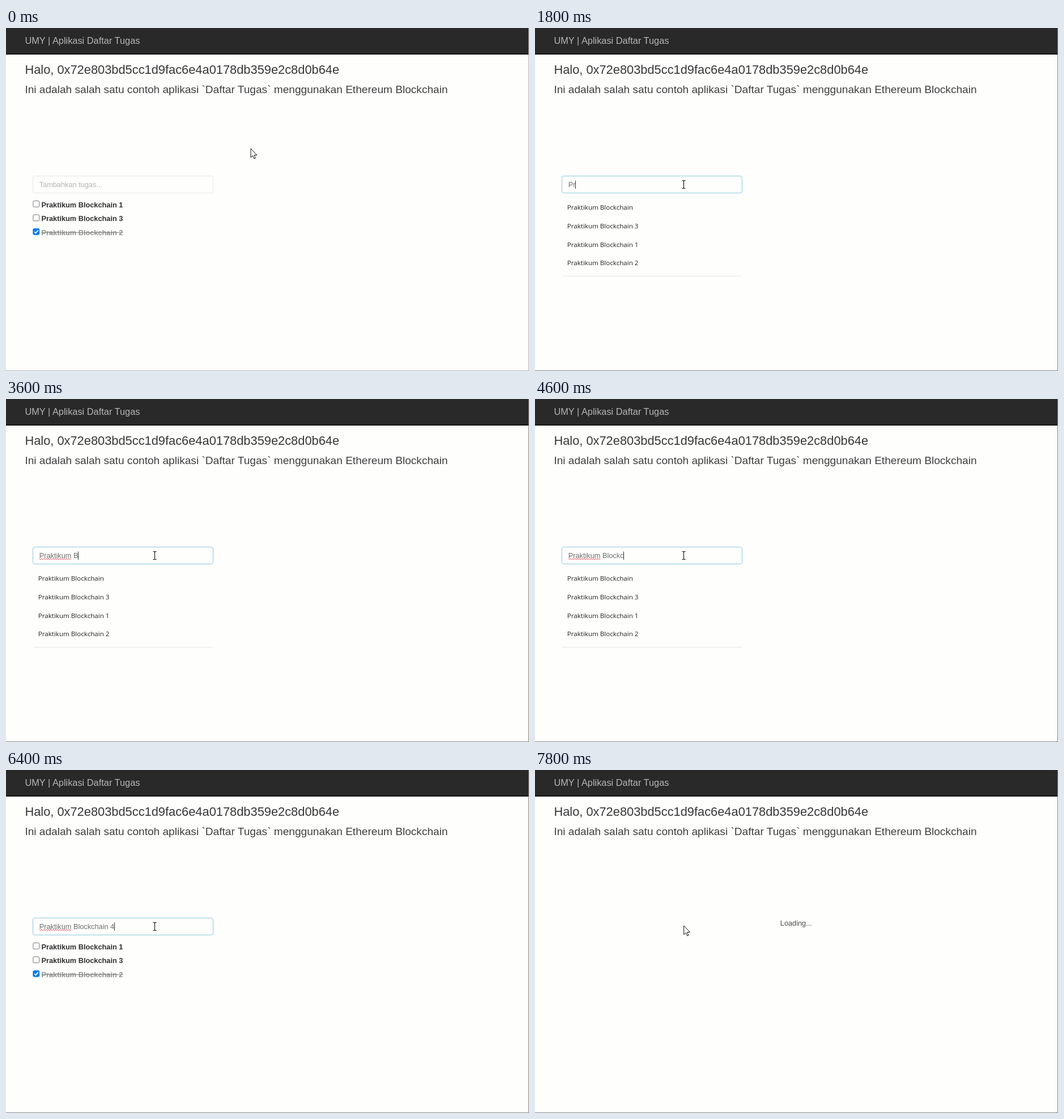
An HTML page that plays this animation: 923 by 606 pixels, repeating every 8 s.

```html
<!DOCTYPE html>
<html lang="id">
<head>
<meta charset="utf-8">
<title>Daftar Tugas</title>
<style>
  html, body { margin: 0; width: 100%; height: 100%; overflow: hidden; background: #fefefd; }
  svg { display: block; width: 100%; height: 100%; }
  text { font-family: "Liberation Sans", Arial, sans-serif; font-size: 12.75px; white-space: pre; }
  .task { font-weight: bold; fill: #2f2f2f; }
  .done { fill: #8f8f8f; text-decoration: line-through; }
  .hint { font-family: "Open Sans", "Noto Sans", sans-serif; font-size: 11.6px; fill: #222; }
</style>
</head>
<body>
<svg viewBox="0 0 923 606">
  <rect width="923" height="606" fill="#fefefd"/>
  <rect width="922" height="46" fill="#29292a"/>
  <rect y="45" width="922" height="1.9" fill="#0e0e10"/>
  <path id="frame" d="M922.5 0V605.5H0" fill="none"/>
  <text x="33.4" y="28" style="font-size:16.38px" fill="#b6b6b6">UMY | Aplikasi Daftar Tugas</text>
  <text x="33.4" y="81" style="font-size:21.84px" fill="#383838">Halo, 0x72e803bd5cc1d9fac6e4a0178db359e2c8d0b64e</text>
  <text x="33.4" y="115" style="font-size:19.1px" fill="#3e3e3e">Ini adalah salah satu contoh aplikasi `Daftar Tugas` menggunakan Ethereum Blockchain</text>

  <g id="form">
    <rect id="box" x="47.5" y="261.5" width="318" height="30" rx="3.5" fill="#fefefd"/>
    <text id="entry" x="58.7" y="281.2"></text>
    <path id="squiggle" fill="none" stroke="#e8454a" stroke-width="1"/>
    <path id="caret" stroke="#333" stroke-width="1"/>
    <g id="tasks"></g>
    <g id="hints"></g>
  </g>
  <text id="loading" x="432.8" y="275" fill="#4c4c4c">Loading...</text>

  <path id="arrow" d="M0 0V15.8L3.6 12.5L6 18L8.3 17L6 11.6H10.8Z" fill="#fff" stroke="#111" stroke-width="1" stroke-linejoin="round"/>
  <path id="beam" d="M-3 -7H-1L0 -6L1 -7H3M0 -6V6M-3 7H-1L0 6L1 7H3" fill="none" stroke="#111" stroke-width="1.1"/>
</svg>
<script>
const LOOP = 8000, STEP = 200;
const FOCUS = 800, TYPE = 1600, SUBMIT = 6800, ARROW = 7600;
const PHRASE = "Praktikum Blockchain 4";
const TYPED_WORD = "Praktikum";
const PAUSE_AT = PHRASE.length - 2;
const HISTORY = ["geje", "embuh je", "Praktikum Blockchain", "Praktikum Blockchain 3", "haish", "hi"];
const MATCHES = [2, 3].map(i => HISTORY[i]).concat("Praktikum Blockchain 1", "Praktikum Blockchain 2");
const TASKS = [["Praktikum Blockchain 1"], ["Praktikum Blockchain 3"], ["Praktikum Blockchain 2", true]];

const $ = id => document.getElementById(id);
const show = (id, on) => $(id).setAttribute("visibility", on ? "inherit" : "hidden");
const place = (id, x, y) => $(id).setAttribute("transform", `translate(${x} ${y})`);

$("tasks").innerHTML = TASKS.map(([name, done], i) => {
  const y = 24.5 * i;
  const tick = done ? `<path d="M50.2 ${y + 311}l2.2 2.3 4.3-5" fill="none" stroke="#fff" stroke-width="1.8"/>` : "";
  return `<rect x="47.9" y="${y + 305.4}" width="10.8" height="10.8" rx="2"
    fill="${done ? "#0c7bec" : "#fff"}" stroke="${done ? "#0c7bec" : "#777"}"/>${tick}
    <text class="task${done ? " done" : ""}" x="62.5" y="${y + 316.5}">${name}</text>`;
}).join("");

let shownList = null;
function setHints(list) {
  if (list === shownList) return;
  shownList = list;
  const rows = list.map((s, i) => `<text class="hint" x="56.8" y="${321 + 32.75 * i}">${s}</text>`);
  const end = Math.round(308 + 32.75 * list.length) - .5;
  $("hints").innerHTML = list.length ? rows.join("") + `<path d="M49 ${end}H364" stroke="#e6e6e8"/>` : "";
}

const NONE = [];
function hintsAt(t, typed) {
  if (t < FOCUS || typed === PHRASE.length) return NONE;
  return typed ? MATCHES : HISTORY;
}

// One key per step, with a short rest before the number
const keyTime = i => TYPE + STEP * (i < PAUSE_AT ? i : i + 1);
const typedAt = t => [...PHRASE].filter((_, i) => keyTime(i) <= t).length;

// Zigzag under the unknown word
function wave(x, end, y) {
  let d = `M${x} ${y}`;
  for (let i = 1; x + 2 * i <= end; i++) d += `L${x + 2 * i} ${y + (i % 2 ? 2 : 0)}`;
  return d;
}

function drawEntry(t, typed) {
  const entry = $("entry"), focused = t >= FOCUS;
  entry.textContent = typed ? PHRASE.slice(0, typed) : "Tambahkan tugas...";
  entry.setAttribute("fill", typed ? "#707070" : "#b4b4b4");
  $("box").setAttribute("stroke", focused ? "#8fc9dd" : "#e9e9ec");

  const x = 58.7 + (typed ? entry.getSubStringLength(0, typed) : 0);
  const lastKey = typed ? keyTime(typed - 1) : FOCUS - 100;
  $("caret").setAttribute("d", `M${Math.floor(x) + .5} 269.5V284`);
  show("caret", focused && (t - lastKey) % 1000 < 500);

  const marked = typed > TYPED_WORD.length;
  show("squiggle", marked);
  if (marked) $("squiggle").setAttribute("d", wave(59, 115.5, 281.8));
}

function drawPointer(t) {
  const p = Math.min(1, Math.max(0, t / 600));
  const k = p * p * (3 - 2 * p);
  const x = 432 - 169.5 * k, y = 213 + 63.5 * k;
  const overInput = y > 261 && x < 366 && t < ARROW;
  show("beam", overInput);
  show("arrow", !overInput);
  place("beam", x, y);
  if (t < ARROW) place("arrow", x, y);
  else place("arrow", 262.7, 275);
}

function draw(time) {
  const t = Math.floor(time % LOOP / STEP) * STEP;
  const typed = typedAt(t);
  const loading = t >= SUBMIT;
  const list = hintsAt(t, typed);

  $("frame").setAttribute("stroke", t < STEP ? "#b4b4b4" : "#858585");
  $("form").setAttribute("visibility", loading ? "hidden" : "visible");
  show("loading", loading);
  setHints(list);
  show("tasks", !list.length);
  drawEntry(t, typed);
  drawPointer(t);
}

const start = performance.now();
function tick() {
  draw(performance.now() - start);
  requestAnimationFrame(tick);
}
tick();
</script>
</body>
</html>
```
